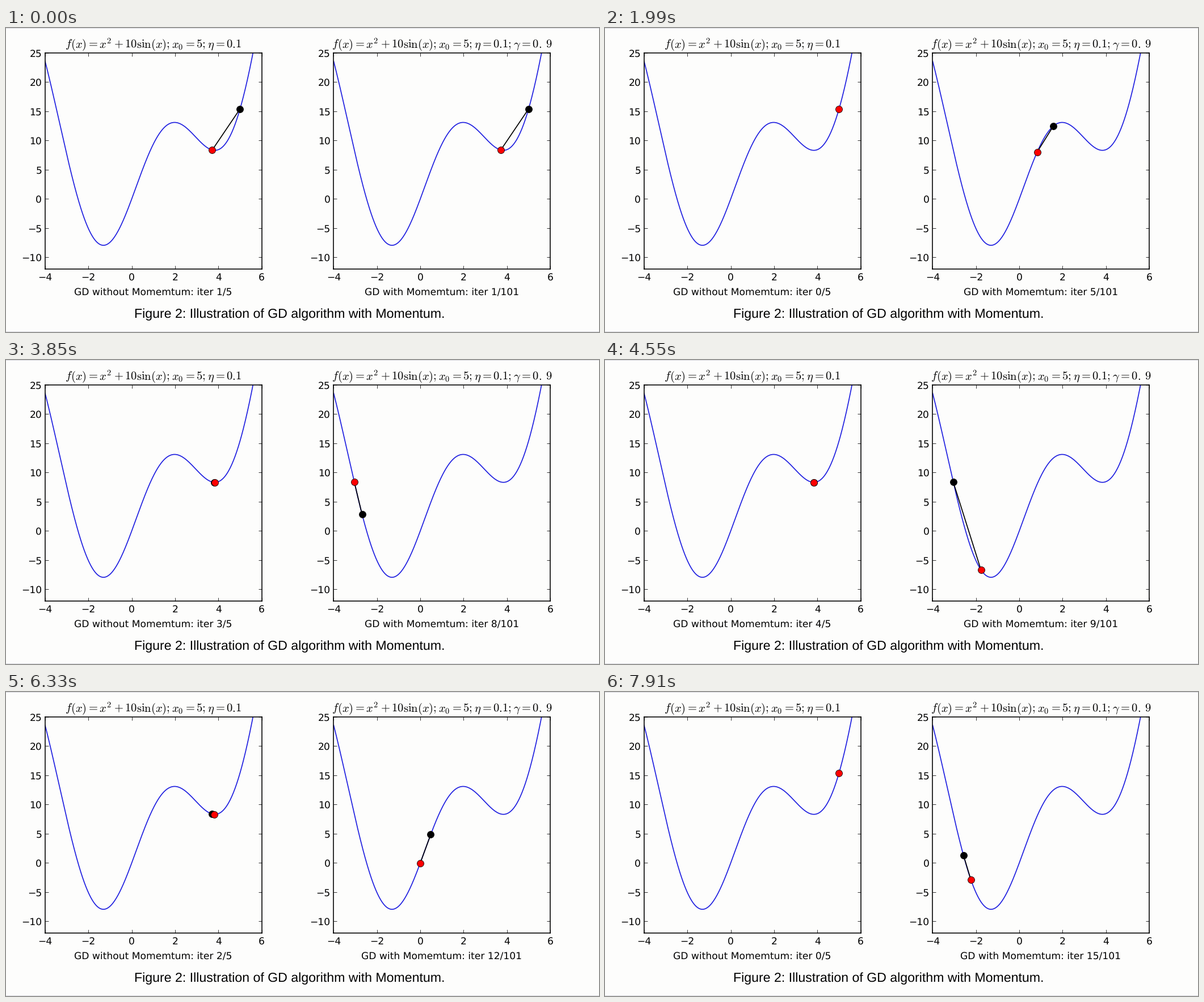
A matplotlib script for the animation above (8 s loop, 1045 px wide and 536 px high).

```python
import numpy as np
import matplotlib.pyplot as plt
from matplotlib.animation import FuncAnimation
from matplotlib.patches import Rectangle

W, H, DPI = 1045, 536, 64
FRAMES, INTERVAL = 200, 40
STEP_MS, LEAD_MS = 560, 360
ETA, GAMMA, START = 0.1, 0.9, 5.0
BG, BLUE = "#fdfdfc", "#1e1ee0"


def pt(px):
    """Pixels to points."""
    return px * 72 / DPI


plt.rcParams.update({
    "font.family": "DejaVu Sans",
    "font.size": pt(17.1),
    "mathtext.fontset": "cm",
    "text.hinting": "none",
    "axes.unicode_minus": True,
})


def f(x):
    return x ** 2 + 10 * np.sin(x)


def grad(x):
    return 2 * x + 10 * np.cos(x)


def descend(steps, gamma):
    xs, v = [START], 0.0
    for _ in range(steps):
        v = gamma * v + ETA * grad(xs[-1])
        xs.append(xs[-1] - v)
    return np.array(xs)


fig = plt.figure(figsize=(W / DPI, H / DPI), dpi=DPI, facecolor=BG)


def label(x, y, text, **kw):
    return fig.text(x / W, 1 - y / H, text, ha="center", va="baseline", **kw)


class Panel:
    def __init__(self, left, title, name, total, path):
        self.name, self.total, self.path = name, total, path
        right, top, bottom = left + 381.7, 43.9, 424.9
        ax = fig.add_axes([left / W, 1 - bottom / H,
                           (right - left) / W, (bottom - top) / H],
                          facecolor=BG)
        ax.set(xlim=(-4, 6), ylim=(-12, 25),
               xticks=range(-4, 7, 2), yticks=range(-10, 26, 5))
        ax.tick_params(direction="in", top=True, right=True,
                       length=pt(5.7), width=pt(0.8))
        ax.tick_params(axis="x", pad=pt(6.8))
        ax.tick_params(axis="y", pad=pt(5.7))
        for spine in ax.spines.values():
            spine.set_linewidth(pt(1.6))

        x = np.linspace(-4, 6, 400)
        ax.plot(x, f(x), color=BLUE, lw=pt(1.7))
        self.link, = ax.plot([], [], color="black", lw=pt(1.7))
        self.prev = self.dot(ax, "black")
        self.cur = self.dot(ax, "red")

        mid = (left + right) / 2
        label(mid, 35, title, fontsize=pt(20.55))
        self.caption = label(mid - 0.5, 471, "")

    @staticmethod
    def dot(ax, color):
        return ax.plot([], [], "o", color=color, ms=pt(12),
                       mec="black", mew=pt(0.8))[0]

    def show(self, i):
        xs = self.path[max(i - 1, 0):i + 1]
        ys = f(xs)
        self.link.set_data(xs, ys)
        self.prev.set_data(xs[:-1], ys[:-1])
        self.cur.set_data(xs[-1:], ys[-1:])
        self.caption.set_text(f"{self.name}: iter {i}/{self.total}")
        return self.link, self.prev, self.cur, self.caption


FORMULA = r"f(x) = x^2 + 10\mathrm{sin}(x); x_0 = 5; \eta = 0.1"
plain = Panel(68.9, f"${FORMULA}$", "GD without Momemtum", 5,
              descend(5, 0))
heavy = Panel(577.4, rf"${FORMULA}; \gamma = 0.\:9$", "GD with Momemtum", 101,
              descend(101, GAMMA))

label(499.5, 511, "Figure 2: Illustration of GD algorithm with Momentum.",
      family="Liberation Sans", fontsize=pt(23.15))

# Hairlines along the top and bottom edges
for y in (0, H - 1):
    fig.add_artist(Rectangle((0, y / H), 1, 1 / H, transform=fig.transFigure,
                             facecolor="#d8d8de", edgecolor="none"))


def update(k):
    i = 1 + (k * INTERVAL + LEAD_MS) // STEP_MS
    return plain.show(i % 5) + heavy.show(i)


anim = FuncAnimation(fig, update, frames=FRAMES, interval=INTERVAL,
                     init_func=lambda: update(0), repeat=True,
                     repeat_delay=0, blit=False)
plt.show()
```
